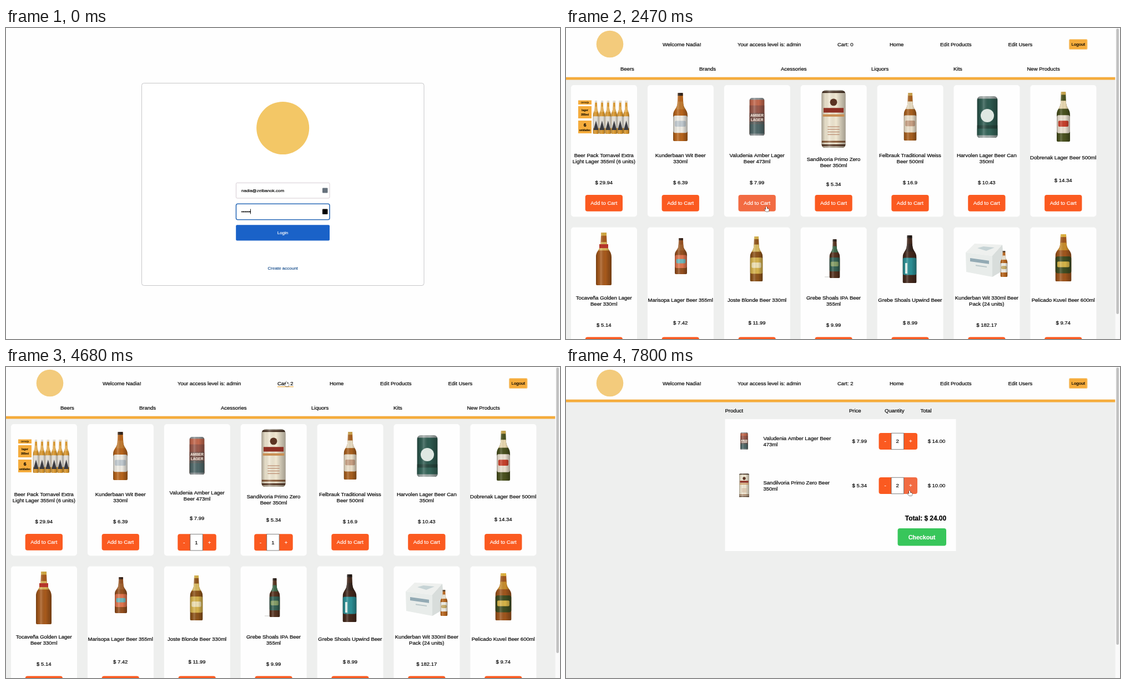
Animation of 998x561 px, one loop 8 s. Source, as an HTML page with a canvas:

```html
<!DOCTYPE html>
<html lang="en">
<head>
<meta charset="utf-8">
<title>Shop checkout</title>
<style>
html, body { margin: 0; width: 100%; height: 100%; overflow: hidden; background: #fefefe; }
canvas { display: block; width: 998px; height: 561px; }
</style>
</head>
<body>
<canvas id="stage"></canvas>
<script>
const W = 998, H = 561, LOOP = 8000, STEP = 130;
const canvas = document.getElementById('stage');
const g = canvas.getContext('2d');
const dpr = window.devicePixelRatio || 1;
canvas.width = W * dpr;
canvas.height = H * dpr;

const SANS = '"Liberation Sans", Arial, Helvetica, sans-serif';
const ORANGE = '#fb5a20', HOVER = '#f26b42', AMBER = '#f5ac3c', PAGE = '#eeefee';

// Pointer stops: time, x, y
const PATH = [
  [390, 560, 415], [1170, 466, 366], [1300, 466, 366], [1820, 413, 347],
  [2470, 361, 322], [2600, 361, 322], [3250, 474, 318], [3510, 474, 318],
  [4680, 505, 26], [5330, 505, 26], [6370, 621, 139], [6760, 621, 139], [7540, 619, 223]
];

let mouse = null, hand = false;

function pointerAt(t) {
  if (t < PATH[0][0]) return null;
  const i = PATH.findIndex(p => p[0] > t);
  if (i < 0) return PATH[PATH.length - 1].slice(1);
  const [t0, x0, y0] = PATH[i - 1], [t1, x1, y1] = PATH[i];
  const k = 0.5 - Math.cos(Math.PI * (t - t0) / (t1 - t0)) / 2;
  return [x0 + (x1 - x0) * k, y0 + (y1 - y0) * k];
}

function over(x, y, w, h) {
  const hit = !!mouse && mouse[0] >= x && mouse[0] <= x + w && mouse[1] >= y && mouse[1] <= y + h;
  if (hit) hand = true;
  return hit;
}

function rect(x, y, w, h, fill) {
  g.fillStyle = fill;
  g.fillRect(x, y, w, h);
}

function box(x, y, w, h, r, fill, stroke, line = 1) {
  g.beginPath();
  g.roundRect(x, y, w, h, r);
  if (fill) { g.fillStyle = fill; g.fill(); }
  if (stroke) { g.strokeStyle = stroke; g.lineWidth = line; g.stroke(); }
}

function disc(x, y, r, fill) {
  g.beginPath();
  g.arc(x, y, r, 0, Math.PI * 2);
  g.fillStyle = fill;
  g.fill();
}

// y is the middle of the capitals; the hairline stroke gives the strong stems
function text(s, x, y, size = 9.5, color = '#000', align = 'left', weight = '') {
  g.font = `${weight} ${size}px ${SANS}`;
  g.textAlign = align;
  g.fillStyle = g.strokeStyle = color;
  g.lineWidth = 0.2;
  g.fillText(s, x, y + size * 0.36);
  g.strokeText(s, x, y + size * 0.36);
}

const mid = (s, x, y, size, color, weight) => text(s, x, y, size, color, 'center', weight);

function shade(cx, y, w, h) {
  const s = g.createLinearGradient(cx - w / 2, 0, cx + w / 2, 0);
  s.addColorStop(0, 'rgba(0,0,0,.3)');
  s.addColorStop(0.15, 'rgba(0,0,0,.05)');
  s.addColorStop(0.32, 'rgba(255,255,255,.2)');
  s.addColorStop(0.6, 'rgba(0,0,0,0)');
  s.addColorStop(1, 'rgba(0,0,0,.32)');
  rect(cx - w / 2, y, w, h, s);
}

function bottle(cx, y, w, h, glass, cap, neck, label, mark) {
  const n = w * 0.17, b = w / 2, foot = y + h;
  g.save();
  g.beginPath();
  g.moveTo(cx - n, y);
  g.lineTo(cx + n, y);
  g.lineTo(cx + n * 1.2, y + h * 0.22);
  g.bezierCurveTo(cx + n * 1.4, y + h * 0.34, cx + b, y + h * 0.34, cx + b, y + h * 0.47);
  g.lineTo(cx + b, foot - 2);
  g.quadraticCurveTo(cx + b, foot, cx + b - 2, foot);
  g.lineTo(cx - b + 2, foot);
  g.quadraticCurveTo(cx - b, foot, cx - b, foot - 2);
  g.lineTo(cx - b, y + h * 0.47);
  g.bezierCurveTo(cx - b, y + h * 0.34, cx - n * 1.4, y + h * 0.34, cx - n * 1.2, y + h * 0.22);
  g.clip();
  rect(cx - b, y, w, h, glass);
  rect(cx - b, y, w, h * 0.06, cap);
  if (neck) rect(cx - b, y + h * 0.18, w, h * 0.16, neck);
  if (label) box(cx - b, y + h * 0.47, w, h * 0.36, w * 0.15, label);
  if (mark) box(cx - w * 0.38, y + h * 0.58, w * 0.76, h * 0.12, 2, mark);
  shade(cx, y, w, h);
  g.restore();
}

function can(cx, y, w, h, bands) {
  g.save();
  g.beginPath();
  g.roundRect(cx - w / 2, y, w, h, [w * 0.18, w * 0.18, w * 0.14, w * 0.14]);
  g.clip();
  bands.forEach(([from, color]) => rect(cx - w / 2, y + h * from, w, h * (1 - from), color));
  shade(cx, y, w, h);
  g.restore();
}

function redCan(cx, y, w, h) {
  can(cx, y, w, h, [[0, '#8f9698'], [0.05, '#c4694e'], [0.2, '#9b5a4c'], [0.4, '#7d5850'], [0.63, '#5f6462'], [0.7, '#50696a'], [0.95, '#8f9698']]);
  ['AMBER', 'LAGER'].forEach((s, i) => mid(s, cx, y + h * (0.47 + i * 0.11), w * 0.24, '#f0e4d8', 'bold'));
}

function creamCan(cx, y, w, h) {
  can(cx, y, w, h, [[0, '#9c9488'], [0.02, '#4a3426'], [0.05, '#f1e8d2'], [0.88, '#8a5a38'], [0.91, '#f1e8d2'], [0.94, '#5a3a28'], [0.97, '#b5aa98']]);
  disc(cx, y + h * 0.21, w * 0.15, '#5b3423');
  rect(cx - w * 0.42, y + h * 0.31, w * 0.84, h * 0.08, '#8e2f24');
  rect(cx - w * 0.45, y + h * 0.42, w * 0.9, h * 0.04, '#c98e52');
  for (let i = 0; i < 4; i++) rect(cx - w * 0.25, y + h * (0.63 + i * 0.045), w * 0.5, h * 0.012, '#b98b70');
}

function sixPack() {
  rect(22, 130.5, 24, 7.5, AMBER);
  rect(22, 141, 24, 22, AMBER);
  rect(22, 167, 24, 23, AMBER);
  mid('cerveja', 34, 134.5, 4.5, '#5a3c08');
  mid('lager', 34, 148, 5, '#2a1c04', 'bold');
  mid('355ml', 34, 156, 5, '#2a1c04', 'bold');
  mid('6', 34, 175, 8.5, '#000', 'bold');
  mid('unidades', 34, 184, 4.5, '#2a1c04', 'bold');
  for (let i = 0; i < 6; i++) {
    const x = 54 + i * 10.9;
    bottle(x, 131, 11, 60, '#dc9a31', '#e6e2da', '#e9b45c', '#e9e5dc');
    g.beginPath();
    g.moveTo(x, 167); g.lineTo(x + 4.5, 184); g.lineTo(x - 4.5, 184);
    g.fillStyle = '#3b3c42';
    g.fill();
  }
}

function crate() {
  const face = (pts, fill) => {
    g.beginPath();
    pts.forEach(p => g.lineTo(p[0], p[1]));
    g.fillStyle = fill;
    g.fill();
  };
  face([[720, 405], [736, 389], [786, 391], [768, 411]], '#eef0ee');
  face([[720, 405], [768, 411], [768, 449], [721, 440]], '#e8ecea');
  face([[768, 411], [786, 391], [790, 436], [768, 449]], '#d8dddb');
  g.save();
  g.transform(1, 0.14, 0, 1, 0, 0);
  rect(728, 313, 34, 6, '#93aab4');
  rect(738, 324, 20, 2, '#b9c7c9');
  g.restore();
  face([[741, 397], [752, 394], [772, 396], [757, 402]], '#c6d3d5');
  bottle(789, 402, 13, 47, '#b9671f', '#5a4630', '#ece6d6', '#f0eee6', '#c9ad6a');
}

// Name lines, price, picture, vertical shift of name and price
const GOODS = [
  [['Beer Pack Tornavel Extra', 'Light Lager 355ml (6 units)'], '29.94', sixPack],
  [['Kunderbaan Wit Beer', '330ml'], '6.39', () => bottle(206, 117, 26, 87, '#b8651c', '#30241c', '#c07a30', '#f1eee6', '#c3ccd2')],
  [['Valudenia Amber Lager', 'Beer 473ml'], '7.99', () => redCan(344, 126, 27, 68)],
  [['Sandilvoria Primo Zero', 'Beer 350ml'], '5.34', () => creamCan(482, 112, 43, 104), 7, 3],
  [['Felbrauk Traditional Weiss', 'Beer 500ml'], '16.9', () => bottle(620, 117, 23, 86, '#a8601f', '#caa24e', '#e8dcc2', '#eee2cc', '#c9a184')],
  [['Harvolen Lager Beer Can', '350ml'], '10.43', () => {
    can(759, 123, 37, 75, [[0, '#a4adab'], [0.06, '#2f5c51'], [0.7, '#28483f'], [0.78, '#35665a'], [0.94, '#a4adab']]);
    disc(759, 158, 12, '#dfe8e2');
  }],
  [['Dobrenak Lager Beer 500ml'], '14.34', () => bottle(896, 115, 24, 90, '#4a521f', '#c9a54a', '#ead9b0', '#ece2d2', '#c8402c')],
  [['Tocaveña Golden Lager', 'Beer 330ml'], '5.14', () => {
    bottle(68, 369, 28, 95, '#a85a1c', '#d3a83f', '#d9b258');
    rect(60, 390, 16, 7, '#b5352a');
  }],
  [['Marisopa Lager Beer 355ml'], '7.42', () => bottle(207, 379, 22, 65, '#96501f', '#39241a', '#a0602c', '#e2764f', '#6fb9bd')],
  [['Joste Blonde Beer 330ml'], '11.99', () => bottle(343, 376, 23, 81, '#8f551b', '#d6b24c', '#d9bb62', '#d8b44e', '#f0e2b4')],
  [['Grebe Shoals IPA Beer', '355ml'], '9.99', () => {
    rect(466, 448, 18, 2, '#e4e4e2');
    bottle(484, 381, 19, 70, '#56331f', '#2c2019', '#3f6a4c', '#356154', '#87a069');
  }],
  [['Grebe Shoals Upwind Beer'], '8.99', () => {
    bottle(619, 374, 25, 86, '#43281c', '#1f1713', '#33231c', '#2c9096');
    rect(611, 424, 4, 19, '#dcebe8');
  }],
  [['Kunderban Wit 330ml Beer', 'Pack (24 units)'], '182.17', crate],
  [['Pelicado Kuvel Beer 600ml'], '9.74', () => bottle(896, 372, 29, 85, '#a0561d', '#e0b23c', '#c98d2c', '#3f4d22', '#d8b548')]
];

function stepper(x, y, n) {
  over(x, y, 69.5, 30);
  const part = (px, w, r, s) => {
    const on = over(px, y, w, 30);
    box(px, y, w, 30, r, on ? HOVER : ORANGE);
    mid(s, px + w / 2, y + 15, 9.5, '#fff');
  };
  part(x, 23, [4, 0, 0, 4], '-');
  part(x + 45, 24.5, [0, 4, 4, 0], '+');
  box(x + 22.5, y + 0.3, 22.5, 29.4, 0, '#fff', '#4a4a4a', 0.7);
  mid(n, x + 33.6, y + 15);
}

function addButton(x, y) {
  box(x, y, 67.3, 29.7, 4, over(x, y, 67.3, 29.7) ? HOVER : ORANGE);
  mid('Add to Cart', x + 33.6, y + 15, 9.5, '#fff');
}

function card(item, i, inCart) {
  const [name, price, draw, dName = 0, dPrice = 0] = item;
  const x = 9 + (i % 7) * 137.9, y = i < 7 ? 103 : 359.5, cx = x + 59.3;
  box(x, y, 119, 237.5, 5, '#fefefe');
  draw();
  const single = name.length < 2;
  const nameY = y + (single ? 131 : 127) + dName - (inCart ? 3 : 0);
  name.forEach((s, k) => mid(s, cx, nameY + k * 11));
  mid('$ ' + price, cx, y + (single ? 172 : 176) + dPrice - (inCart ? 6 : 0));
  if (inCart) stepper(x + 24.5, y + 198.3, 1);
  else addButton(x + 25.7, y + 198);
}

function chrome(barY, count, thumbEnd) {
  rect(0, 0, W, H, PAGE);
  rect(0, 0, 990, barY, '#fefefe');
  rect(0, barY, 989.5, 4.8, AMBER);
  disc(79, 29, 24.3, '#f3cb7c');
  [['Welcome Nadia!', 174], ['Your access level is: admin', 309], ['Cart: ' + count, 489],
    ['Home', 583], ['Edit Products', 674], ['Edit Users', 796.5]].forEach(([s, x]) => text(s, x, 29.5));
  if (over(488, 20, 31, 18)) rect(489, 35, 29, 1.2, AMBER);
  box(906.5, 20.5, 32.5, 18, 2, AMBER, '#f9cd88', 1.2);
  mid('Logout', 922.7, 29.5, 8);
  rect(989.5, 0, 8.5, H, '#fafafa');
  box(991.3, 1, 4.7, thumbEnd - 1, 2.3, '#c1c1c1');
}

function login(t) {
  rect(0, 0, W, H, '#fefefe');
  box(244.5, 99.5, 508.5, 365, 4, '#fff', '#c6c6c8');
  disc(498.7, 180.5, 47.5, '#f3c766');
  box(414.5, 279.3, 168.5, 27.7, 2, '#fff', '#d5ccd2');
  text('nadia@zelbanok.com', 424, 293, 8);
  box(570, 288.5, 9.5, 9, 1, '#66717c');
  box(414.5, 317.3, 168.5, 28.5, 3, '#fff', '#2d6cb8', 1.6);
  for (let i = 0; i < 6; i++) disc(425.3 + i * 2.75, 331.5, 1.15, '#000');
  if (t < 520 || t >= 1040) rect(440, 326.5, 0.9, 9, '#000');
  box(570, 326.5, 9.5, 9.5, 1, '#000');
  const on = over(414.2, 355.2, 168.8, 28.2);
  box(414.2, 355.2, 168.8, 28.2, 2, on ? '#2a6fd2' : '#1a62c8');
  mid('Login', 498.5, 369.5, 8, '#fff');
  mid('Create account', 498.7, 433, 8, '#1f5490');
}

function shop(t) {
  const first = t >= 2730, second = t >= 3380;
  chrome(88.7, first + second, 516);
  [['Beers', 98], ['Brands', 240], ['Acessories', 387], ['Liquors', 550], ['Kits', 698], ['New Products', 830.5]]
    .forEach(([s, x]) => text(s, x, 74));
  GOODS.forEach((item, i) => card(item, i, (i === 2 && first) || (i === 3 && second)));
}

function cartRow(y, name, price, n, draw) {
  draw();
  name.forEach((s, k) => text(s, 355.5, y - 5.5 + k * 11));
  text('$ ' + price, 515.5, y);
  stepper(563.5, y - 15, n);
  mid('$ ' + n * Math.floor(price) + '.00', 667.5, y);
}

function cart(t) {
  const a = t >= 6630 ? 2 : 1, b = t >= 7800 ? 2 : 1;
  chrome(58.7, 2, 501);
  [['Product', 286.5], ['Price', 510], ['Quantity', 574], ['Total', 638.5]].forEach(([s, x]) => text(s, x, 79));
  rect(286.5, 94, 416, 238, '#fefefe');
  cartRow(134, ['Valudenia Amber Lager Beer', '473ml'], 7.99, a, () => redCan(321, 118, 13.5, 31));
  cartRow(214, ['Sandilvoria Primo Zero Beer', '350ml'], 5.34, b, () => creamCan(321, 192, 18, 43));
  text(`Total: $ ${a * 7 + b * 5}.00`, 685, 272.5, 11.85, '#000', 'right', 'bold');
  over(597.5, 291, 87.5, 31.5);
  box(597.5, 291, 87.5, 31.5, 4, '#38c65b');
  mid('Checkout', 641, 307, 10.7, '#fff', 'bold');
}

function drawPointer() {
  if (!mouse) return;
  g.save();
  g.translate(mouse[0], mouse[1]);
  g.lineJoin = 'round';
  const shape = new Path2D(hand
    ? 'M-1 .6Q0-.6 1 .6V3.6L4 4.2Q5 4.6 4.8 6L4 9H-1L-3.6 5.8Q-3.6 4.6-2.4 5L-1 6Z'
    : 'M0 0V7.6L1.8 6 3 8.8 4.1 8.3 3 5.6H5.4Z');
  g.lineWidth = hand ? 0.9 : 1.2;
  g.strokeStyle = hand ? '#000' : '#fff';
  g.fillStyle = hand ? '#fff' : '#000';
  g.stroke(shape);
  g.fill(shape);
  g.restore();
}

function frame(now) {
  const t = Math.floor((now % LOOP) / STEP) * STEP;
  g.setTransform(dpr, 0, 0, dpr, 0, 0);
  mouse = pointerAt(t);
  hand = false;
  if (t < 1430) login(t);
  else if (t < 5070) shop(t);
  else cart(t);
  drawPointer();
}

const start = performance.now();
function loop() {
  frame(performance.now() - start);
  requestAnimationFrame(loop);
}
loop();
</script>
</body>
</html>
```
